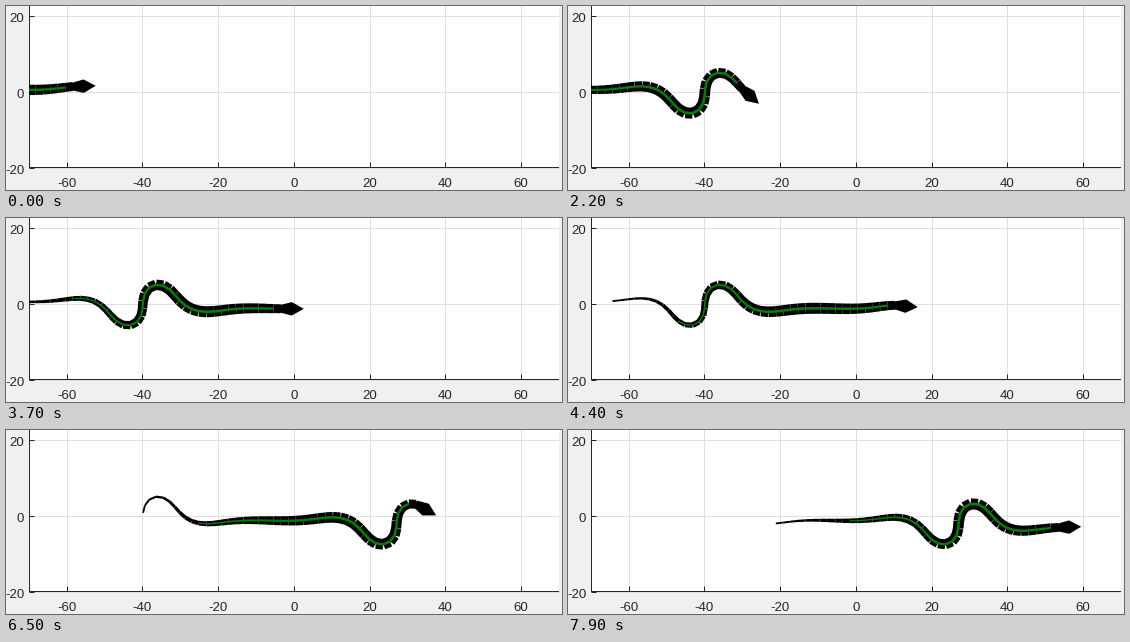
Animation, 556 px wide and 184 px high, one loop 8 s. Source, as a matplotlib script:

```python
import numpy as np
import matplotlib.pyplot as plt
from matplotlib.animation import FuncAnimation
from matplotlib.collections import LineCollection
from matplotlib.patches import Polygon, Rectangle

W, H, DPI = 556, 184, 64
PX = 72 / DPI                     # one pixel in points
FRAMES, INTERVAL = 80, 100
SEGMENTS, STEP = 44, 7.46

plt.rcParams["font.family"] = "Liberation Sans"
fig = plt.figure(figsize=(W / DPI, H / DPI), dpi=DPI, facecolor="#f0f0f0")
ax = fig.add_axes([0, 0, 1, 1])
ax.set(xlim=(0, W), ylim=(H, 0))
ax.axis("off")

# Plot area, grid, ticks and labels, in pixel coordinates
LEFT, RIGHT, BOTTOM = 23.5, 553, 161.5
INK, GRID = "#262626", "#dfdfdf"
SCALE, ORIGIN = 3.786, (288.3, 86.3)
area = Rectangle((LEFT - 0.5, -2), RIGHT - LEFT + 0.5, BOTTOM + 2.5,
                 fc="white", lw=0, zorder=0)
ax.add_patch(area)


def line(xs, ys, color, z):
    ax.plot(xs, ys, color=color, lw=PX, zorder=z, snap=False,
            solid_capstyle="butt")


def label(x, y, value, align):
    ax.text(x, y, str(value), ha=align, va="baseline", color=INK,
            fontsize=13.3 * PX)


for value in range(-60, 61, 20):
    x = np.floor(ORIGIN[0] + value * SCALE) + 0.5
    line([x, x], [0, BOTTOM], GRID, 1)
    line([x, x], [BOTTOM - 5, BOTTOM], INK, 2)
    label(x - 0.8, 181, value, "center")
for value in (20, 0, -20):
    y = np.floor(ORIGIN[1] - value * SCALE) + 0.5
    line([LEFT, RIGHT], [y, y], GRID, 1)
    line([LEFT, LEFT + 5], [y, y], INK, 2)
    label(18.3, y + 5.8, value, "right")
line([LEFT, LEFT], [0, BOTTOM + 0.5], INK, 2)
line([LEFT - 0.5, RIGHT], [BOTTOM, BOTTOM], INK, 2)

# The track: a nearly level heading with two identical damped swerves
SWERVE, PERIOD = 93, 299.5        # arc length of the first, and spacing
arc = np.arange(-400, 600, 0.5)
heading = np.full(arc.shape, 0.014)
for centre in (SWERVE, SWERVE + PERIOD):
    d = arc - centre
    heading -= 1.52 * np.cos(np.pi / 2 * d / 28.6) * np.exp(-(d / 70) ** 2)
track = 0.5 * np.cumsum([np.cos(heading), np.sin(heading)], axis=1)
anchor = np.array([136.8, 86.8])
track += (anchor - track[:, np.searchsorted(arc, SWERVE)])[:, None]


def at(s):
    return np.stack([np.interp(s, arc, axis) for axis in track], -1)


# The snake moves one segment per frame, except for short pauses
advance = np.ones(FRAMES)
advance[[0, 7, 12, 32, 45, 50, 53, 59, 63, 68, 73]] = 0
travel = np.cumsum(advance) * STEP

# Thickness swells behind the neck and tapers to the tail
u = np.linspace(1, 0, SEGMENTS)
thick = 1.8 + 9.2 * np.sin(0.68 * np.pi * u) ** 1.5
striped = slice(1, 34)

body = LineCollection([], colors="black", linewidths=thick * PX,
                      capstyle="butt", zorder=4)
stripe = LineCollection([], colors="#008000",
                        linewidths=0.24 * thick[striped] * PX,
                        capstyle="butt", zorder=5)
head = Polygon(np.zeros((5, 2)), fc="black", lw=0, zorder=6)
for artist in (body, stripe):
    ax.add_collection(artist)
ax.add_patch(head)
for artist in (body, stripe, head):
    artist.set_clip_path(area)

HEAD = np.array([(-1, -3.7), (11, -6.7), (23, 0), (11, 6.7), (-1, 3.7)])


def draw(frame):
    s = travel[frame]
    joints = at(s - STEP * np.arange(SEGMENTS + 1))
    links = np.stack([joints[:-1], joints[1:]], axis=1)
    body.set_segments(links)
    stripe.set_segments(links[striped])
    ahead = at(s + STEP) - joints[0]
    dx, dy = ahead / np.hypot(*ahead)
    head.set_xy(joints[0] + HEAD @ np.array([(dx, dy), (-dy, dx)]))
    return body, stripe, head


anim = FuncAnimation(fig, draw, frames=FRAMES, interval=INTERVAL,
                     repeat=True, repeat_delay=0, blit=False)
plt.show()
```
